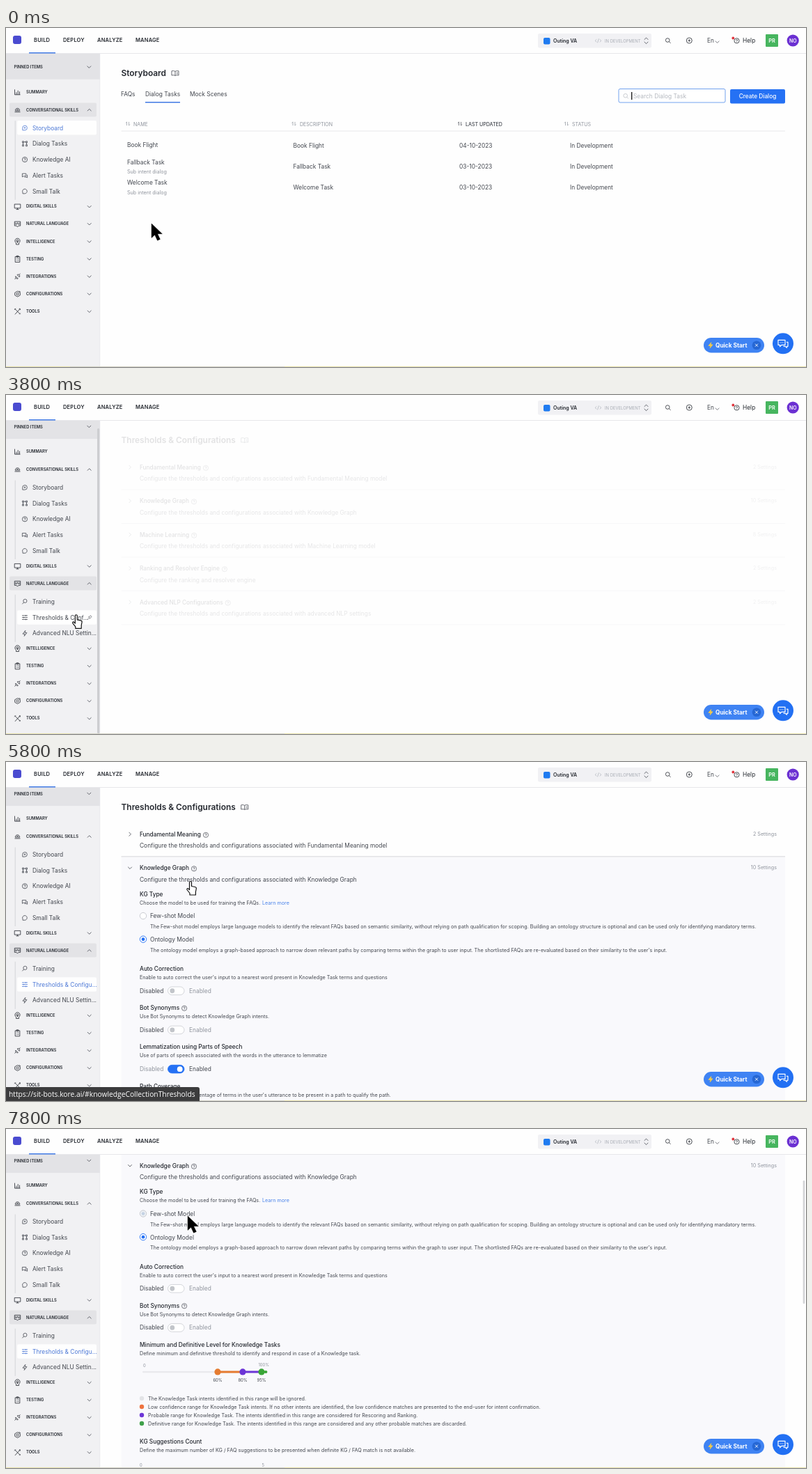
These frames come from a looping animation (1149x487 px, 8 s). An HTML page with a canvas:

```html
<!DOCTYPE html>
<html lang="en">
<head>
<meta charset="utf-8">
<title>Bot builder walkthrough</title>
<style>
html, body { margin: 0; width: 100%; height: 100%; overflow: hidden; background: #fefefe; }
canvas { display: block; width: 1149px; height: 487px; }
</style>
</head>
<body>
<canvas id="stage"></canvas>
<script>
const W = 1149, H = 487, LOOP = 8000, STEP = 200;
const canvas = document.getElementById('stage');
const dpr = window.devicePixelRatio || 1;
canvas.width = W * dpr;
canvas.height = H * dpr;
const c = canvas.getContext('2d');

const INK = '#24282f', BODY = '#42464e', GREY = '#8f949d', PALE = '#b4b8bf';
const BLUE = '#2571f4', LINK = '#4a83ea', ACTIVE = '#4c78d6', LINE = '#c9cacf';
const HOVER = '#f9f9fc', BAND = '#e3e3e6';
// Font sizes: body, small and medium-weight headings.
const M = 8.39, S = 7.2, HEAD = 8.3;

// Icons drawn around their centre.
const ICON = {
  chart: 'M-4-4V3.5H4M-1.7 3.5V0M.7 3.5V-2.5M3 3.5V-1',
  bell: 'M-3.2 1C-3.2-3.6 3.2-3.6 3.2 1ZM-4 2.8H4M-1.5-.6h3',
  story: 'M-3.2 3.3H0A3.3 3.3 0 1 0-3.2.4ZM0-1.4V1M-1.2 0h2.4',
  tasks: 'M-3.5-3.5h2v2h-2zM1.5-3.5h2v2h-2zM-3.5 1.5h2v2h-2zM1.5 1.5h2v2h-2zM-1.5-2.5h3M-2.5-1.5v3M2.5-1.5v3',
  help: 'M3.6 0A3.6 3.6 0 1 1-3.6 0A3.6 3.6 0 1 1 3.6 0M-1.1-.8A1.1 1.1 0 1 1 0 .4V.9M0 1.7v.5',
  alert: 'M-3.6-2.6H1.8V1H-1.5L-3.6 2.2ZM3.6-1V3.2L1.8 2.4H-.6',
  talk: 'M-3 3.4H0A3.3 3.3 0 1 0-3 1.6Z',
  screen: 'M-4.3-3.5H4.3V2.2H-4.3ZM-2 4H2M0 2.2V4',
  speech: 'M-4.2-3.5H4.2V2.5H1.5L0 4.2L-1.5 2.5H-4.2ZM-1.6 1L0-2L1.6 1M2.6-2V1M-2.6-2V1',
  mind: 'M-2 4.2V2A3.6 3.6 0 1 1 2 2V4.2ZM-1.6-1A1.6 1.6 0 1 0 1.6-1A1.6 1.6 0 1 0-1.6-1M0-1V2',
  clip: 'M-3.3-3.5H3.3V4.5H-3.3ZM-1.3-4.6H1.3V-2.6H-1.3ZM-1.6-.4h.8M.2-.4h1.6M-1.6 2h.8M.2 2h1.6',
  plug: 'M-4 4L-2 2M-2.6-.4L.8 3C-.6 4.2-3.8 1.6-2.6-.4ZM-.4-2.4L2.6.8C4.4-1.4 1.6-4.2-.4-2.4M2.4-2.6L4-4',
  gear: 'M-3.8-1.8L0-4L3.8-1.8V1.8L0 4L-3.8 1.8ZM-1.6 0A1.6 1.6 0 1 0 1.6 0A1.6 1.6 0 1 0-1.6 0M2-4.2L4.4-2.8',
  tools: 'M-4-4L4 4M-2.4-4.4L-4.4-2.4M4-4.2L-3.6 4.2M2.2-3.4C3-5 5-2.6 3.4-2M2.6 4L4.2 2.4',
  train: 'M3-1A2.6 2.6 0 1 1-2.2-1A2.6 2.6 0 1 1 3-1M-1.4 1L-3.6 3.4',
  tune: 'M-4-2.8H4M-4 0H4M-4 2.8H4M1.5-3.6v1.6M-1.5-.8v1.6M1.5 2v1.6',
  bolt: 'M.8-4L-3 .8H0L-.8 4L3-.8H0Z',
  pin: 'M-3 3L-.8.8M-1.8-1L1 1.8M-1-.6L1.4-2.8L3 -1.2L.6 1.2',
  search: 'M2-.5A2.8 2.8 0 1 1-3.6-.5A2.8 2.8 0 1 1 2-.5M1.3 1.6L3.6 3.8',
  plus: 'M4 0A4 4 0 1 1-4 0A4 4 0 1 1 4 0M-1.8 0H1.8M0-1.8V1.8',
  code: 'M-2.2-2L-4.4 0L-2.2 2M2.2-2L4.4 0L2.2 2M.9-3L-.9 3',
  book: 'M0-2.6V3.4M0-2.6C-1.5-3.6-3.5-3.6-5-3.2V3C-3.5 2.6-1.5 2.6 0 3.4C1.5 2.6 3.5 2.6 5 3V-3.2C3.5-3.6 1.5-3.6 0-2.6M2-1h1.6M2 .8h1.6',
  sort: 'M-1.5 2.6V-2.6L-3-1M1.5-2.6V2.6L3 1',
  down: 'M-2.8-1.4L0 1.4L2.8-1.4',
  up: 'M-2.8 1.4L0-1.4L2.8 1.4',
  right: 'M-1.4-2.8L1.4 0L-1.4 2.8',
  cross: 'M-2-2L2 2M2-2L-2 2',
  chat: 'M-7-5H3V2H-2L-4.5 4.4V2H-7ZM5-2H7V4H5.5V6L3 4H.5M-4.4-1.5h.8M-2.4-1.5h.8M-.4-1.5h.8',
  arrow: 'M0 0V20.5L4.7 16.2L8.5 24.3L12.4 22.5L8.7 14.7H15.4Z',
  hand: 'M-1.5 1.5C-1.5-.5 1.5-.5 1.5 1.5V7L6.5 8C8 8.3 8.5 9 8.3 10.5L7.4 15V19.5H-1V17L-5 12C-5.6 10.4-4 9.6-3 10.7L-1.5 12.2Z',
  beam: 'M-4-11H-1Q0-11 0-10Q0-11 1-11H4M0-10V10M-4 11H-1Q0 11 0 10Q0 11 1 11H4'
};
for (const k in ICON) ICON[k] = new Path2D(ICON[k]);

function text(s, x, y, size, color = BODY, weight = 400, align = 'left', family = 'Inter') {
  c.font = `${weight} ${size}px "${family}", sans-serif`;
  c.fillStyle = color;
  c.textAlign = align;
  c.fillText(s, x, y + size * 0.36);
  return c.measureText(s).width;
}
function box(x, y, w, h, fill, r = 0, stroke) {
  c.beginPath();
  c.roundRect(x, y, w, h, r);
  if (fill) { c.fillStyle = fill; c.fill(); }
  if (stroke) { c.strokeStyle = stroke; c.lineWidth = 0.8; c.stroke(); }
}
function disc(x, y, r, fill, stroke) {
  c.beginPath();
  c.arc(x, y, r, 0, 7);
  if (fill) { c.fillStyle = fill; c.fill(); }
  if (stroke) { c.strokeStyle = stroke; c.lineWidth = 0.9; c.stroke(); }
}
function icon(name, x, y, color = BODY, width = 0.8, fill) {
  c.save();
  c.translate(x, y);
  c.lineJoin = 'round';
  c.lineWidth = width;
  c.strokeStyle = color;
  if (fill) { c.fillStyle = fill; c.fill(ICON[name]); }
  c.stroke(ICON[name]);
  c.restore();
}
function clip(x, y, w, h, draw) {
  c.save();
  c.beginPath();
  c.rect(x, y, w, h);
  c.clip();
  draw();
  c.restore();
}
// Piecewise linear track of [time, ...values].
function track(keys, t) {
  const i = keys.findIndex(k => k[0] > t);
  if (i < 0) return keys[keys.length - 1].slice(1);
  if (i === 0) return keys[0].slice(1);
  const a = keys[i - 1], b = keys[i], p = (t - a[0]) / (b[0] - a[0]);
  return a.slice(1).map((v, j) => v + (b[j + 1] - v) * p);
}

const POINTER = [[0, 209, 281], [800, 88, 277], [1200, 88, 274], [1800, 98, 315], [2200, 100, 315],
  [4200, 101, 316], [5400, 265, 171], [6200, 265, 172], [6600, 265, 172], [7200, 262, 132], [7800, 261, 125]];
const NAV_SCROLL = [[1000, 0], [1400, 10.7]];
const NAV_OPEN = [[800, 0], [1200, 1]];
const FADE = [[3600, 0], [3800, 0.13], [4200, 1]];
const PAGE_SCROLL = [[6000, 0], [6200, 28.3], [6400, 78], [6600, 99.5]];
const STATUS = [[5200, 0], [5400, 0.72], [5600, 1], [6200, 1], [6400, 0]];

function header() {
  box(0, 0, W, 37, '#fefefe');
  box(0, 36, W, 1, '#e7e7ea');
  box(10, 11, 12, 12, '#4a4bd0', 3);
  c.letterSpacing = '0.2px';
  [['BUILD', 40], ['DEPLOY', 82], ['ANALYZE', 131], ['MANAGE', 186]]
    .forEach(([s, x]) => text(s, x, 17.5, 7.5, INK, 600));
  c.letterSpacing = '0px';
  box(33, 35, 38, 1.6, '#3f78e4');
  box(764, 8, 163, 20.5, '#f1f1f4', 2);
  box(772, 14, 9.5, 9.5, '#1f7bf0', 2);
  text('Outing VA', 786, 18, 7, INK, 600);
  icon('code', 850.5, 18.3, PALE);
  text('IN DEVELOPMENT', 860, 18.5, 5.9, '#a9adb5');
  icon('up', 919.5, 15.4);
  icon('down', 919.5, 21.2);
  icon('search', 951, 18, INK);
  icon('plus', 981.3, 18, INK);
  text('En', 1007, 18.3, M, BODY);
  icon('down', 1021.5, 20, BODY, 0.7);
  icon('help', 1049.5, 18.3, INK);
  disc(1044.3, 14.5, 1.9, '#e0343c');
  text('Help', 1058, 18.3, M, INK);
  box(1091, 9, 18, 18, '#47b55f', 1);
  text('PR', 1100, 18.2, 7.4, '#fff', 600, 'center');
  disc(1130.2, 18, 8.6, '#6b30d2');
  text('NO', 1130.2, 18.2, 6.9, '#fff', 600, 'center');
}

const SKILLS = [['Storyboard', 'story'], ['Dialog Tasks', 'tasks'], ['Knowledge AI', 'help'],
  ['Alert Tasks', 'alert'], ['Small Talk', 'talk']];
const LANG = [['Training', 'train'], ['Thresholds & Configu...', 'tune'], ['Advanced NLU Settin...', 'bolt']];
const REST = [['INTELLIGENCE', 'mind'], ['TESTING', 'clip'], ['INTEGRATIONS', 'plug'],
  ['CONFIGURATIONS', 'gear'], ['TOOLS', 'tools']];

function section(label, glyph, y, open, lit) {
  if (lit) box(5, y - 10, 125, 20, BAND, 2);
  icon(glyph, 16.5, y + 0.3, INK);
  text(label, 29, y, 5.8, INK, 600);
  if (open !== undefined) icon(open ? 'up' : 'down', 119.7, y + 0.3);
}
function entries(list, y, active, hover) {
  box(12.7, y - 10, 1, list.length * 22.7, '#d3d4d8');
  list.forEach(([label, glyph], i) => {
    const cy = y + i * 22.75, over = i === hover, on = i === active;
    if (on || over) box(16, cy - 10.3, 114, 20.5, '#fefefe', 2);
    const color = on && !over ? ACTIVE : BODY;
    icon(glyph, 27, cy + 0.2, color);
    text(over ? 'Thresholds & Conf...' : label, 38, cy + 0.2, M, color);
    if (over) icon('pin', 120, cy + 0.2, BODY, 0.7);
  });
}
function sidebar(t, px) {
  const [dy] = track(NAV_SCROLL, t), [open] = track(NAV_OPEN, t);
  const moved = t >= 2800, inside = px < 131;
  clip(0, 37, 135, 449, () => {
    box(0, 37, 135, 449, '#f1f1f3');
    c.translate(0, -dy);
    box(0, 37, 135, 36.7, BAND);
    text('PINNED ITEMS', 11.5, 56.2, 5.8, INK, 600);
    icon('down', 119.3, 56);
    section('SUMMARY', 'chart', 92);
    section('CONVERSATIONAL SKILLS', 'bell', 117.5, true, !moved);
    entries(SKILLS, 143.3, moved ? -1 : 0);
    section('DIGITAL SKILLS', 'screen', 256.3, false);
    section('NATURAL LANGUAGE', 'speech', 281.3, open > 0, moved);
    if (open > 0) clip(0, 292, 135, 75 * open, () =>
      entries(LANG, 307.4, moved ? 1 : -1, t >= 1600 && inside ? 1 : -1));
    REST.forEach(([s, g], i) => section(s, g, 306.5 + 68.2 * open + i * 25.1, false));
  });
  if (open === 1 && inside) box(131, 48, 3.5, 438, '#cdced1', 1.5);
  box(134.5, 37, 0.7, 449, '#e6e6e9');
}

function title(s) {
  const w = text(s, 165.5, 64.3, 11.9, INK, 600);
  icon('book', 165.5 + w + 13, 65);
}
function storyboard(t) {
  title('Storyboard');
  text('FAQs', 165, 94.5, M);
  text('Dialog Tasks', 200, 94.5, M);
  text('Mock Scenes', 264, 94.5, M);
  box(200, 106, 50, 1.4, '#3f78e4');
  const focus = t < 1000;
  box(880, 87.5, 153, 19.5, '#fff', 2, focus ? '#4f8bea' : '#d9dbe0');
  icon('search', 890.5, 97.7, PALE, 0.7);
  text('Search Dialog Task', 901, 98, M, PALE);
  if (focus && t % 1000 < 600) box(898, 92, 1.4, 11, '#222');
  box(1040, 88, 79, 20.5, BLUE, 2);
  text('Create Dialog', 1079.5, 98.3, HEAD, '#fff', 500, 'center');
  [['NAME', 175, 183], ['DESCRIPTION', 413.5, 422], ['LAST UPDATED', 652, 660], ['STATUS', 805, 813]]
    .forEach(([s, ix, x], i) => {
      icon('sort', ix, 137.5, i === 2 ? BODY : GREY, 0.7);
      text(s, x, 138, 7.05, i === 2 ? BODY : GREY, i === 2 ? 500 : 400);
    });
  box(165.5, 147.5, 953.5, 1, '#e9e9ec');
  ['Book Flight', 'Fallback Task', 'Welcome Task'].forEach((s, i) => {
    const y = 169.2 + i * 29.9;
    text(s, 174, i ? y - 6.6 : 167.5, M);
    if (i) text('Sub intent dialog', 174, y + 7.8, S, GREY);
    text(s, 412.5, y, M);
    text(i ? '03-10-2023' : '04-10-2023', 651, y, M);
    text('In Development', 810, y, M);
  });
}
function loading(t) {
  const a = -2.6 + (t - 2200) / 200 * 1.9;
  c.beginPath();
  c.arc(615.5, 286, 6, a, a + 2.5);
  c.strokeStyle = '#5f8fe8';
  c.lineWidth = 1;
  c.stroke();
  text('Loading...', 630, 286, M);
}

const ROWS = [
  ['Fundamental Meaning', 'Configure the thresholds and configurations associated with Fundamental Meaning model', 2],
  ['Knowledge Graph', 'Configure the thresholds and configurations associated with Knowledge Graph', 10],
  ['Machine Learning', 'Configure the thresholds and configurations associated with Machine Learning model', 8],
  ['Ranking and Resolver Engine', 'Configure the ranking and resolver engine', 2],
  ['Advanced NLP Configurations', 'Configure the thresholds and configurations associated with advanced NLP settings', 2]
];
function heading(s, note, y, help) {
  const w = text(s, 192, y, HEAD, INK, 500);
  if (help) icon('help', 192 + w + 7, y + 0.5, BODY, 0.7);
  text(note, 192, y + 12.4, S);
}
function radio(label, note, y, on, fresh) {
  disc(197, y, 4.7, fresh ? '#eef1f5' : '#fff', on ? BLUE : '#c3c6cc');
  if (on || fresh) disc(197, y, 2.4, on ? BLUE : '#c4d2e4');
  text(label, 207, y + 0.4, M);
  text(note, 207, y + 15.7, S);
}
function toggle(y, on) {
  text('Disabled', 192, y, M, on ? GREY : BODY);
  box(232.5, y - 5.8, 23.5, 11.6, on ? BLUE : '#fff', 5.8, on ? BLUE : '#c9ccd1');
  disc(on ? 249.7 : 238.8, y, on ? 3.9 : 3.4, on ? '#fff' : '#c2c5ca');
  text('Enabled', 263, y, M, on ? BODY : GREY);
}
function levels(y) {
  heading('Minimum and Definitive Level for Knowledge Tasks',
    'Define minimum and definitive threshold to identify and respond in case of a Knowledge task.', y);
  const k = y + 39, stops = [['#e57b30', 304, '60%'], ['#6c35d6', 340, '80%'], ['#3aa637', 367, '95%']];
  text('0', 197, y + 30.2, 5.8, GREY);
  text('100%', 362.5, y + 29, 5.8, GREY);
  box(196, k - 1.3, 180, 2.6, '#e9e9ed', 1.3);
  stops.forEach(([color, x], i) => box(x, k - 1.5, (i < 2 ? stops[i + 1][1] : 373) - x, 3, color));
  disc(373.3, k, 2, stops[2][0]);
  stops.forEach(([color, x, s]) => {
    disc(x, k, 4.6, color);
    text(s, x, y + 50.7, 5.9, BODY, 400, 'center');
  });
  [['#e3e4e7', 'The Knowledge Task intents identified in this range will be ignored.'],
    ['#ee7340', 'Low confidence range for Knowledge Task intents. If no other intents are identified, the low confidence matches are presented to the end-user for intent confirmation.'],
    ['#6c35d6', 'Probable range for Knowledge Task. The intents identified in this range are considered for Rescoring and Ranking.'],
    ['#3fa04a', 'Definitive range for Knowledge Task. The intents identified in this range are considered and any other probable matches are discarded.']
  ].forEach(([color, s], i) => {
    disc(195, y + 77 + i * 12, 3.2, color);
    text(s, 204, y + 77.5 + i * 12, S);
  });
  heading('KG Suggestions Count',
    'Define the maximum number of KG / FAQ suggestions to be presented when definite KG / FAQ match is not available.', y + 139.5);
  text('0', 192, y + 172.5, 5.8, GREY);
  text('5', 367.5, y + 172.5, 5.8, GREY);
}
function graphPanel(y, picked) {
  heading('KG Type', 'Choose the model to be used for training the FAQs. ', y + 37.3);
  text('Learn more', 368, y + 49.7, S, LINK);
  radio('Few-shot Model', 'The Few-shot model employs large language models to identify the relevant FAQs based on semantic similarity, without relying on path qualification for scoping. Building an ontology structure is optional and can be used only for identifying mandatory terms.', y + 68.6, false, picked);
  radio('Ontology Model', 'The ontology model employs a graph-based approach to narrow down relevant paths by comparing terms within the graph to user input. The shortlisted FAQs are re-evaluated based on their similarity to the user\'s input.', y + 102.2, true);
  heading('Auto Correction',
    'Enable to auto correct the user\'s input to a nearest word present in Knowledge Task terms and questions', y + 144.6);
  toggle(y + 176.3, false);
  heading('Bot Synonyms', 'Use Bot Synonyms to detect Knowledge Graph intents.', y + 200.8, true);
  toggle(y + 232.5, false);
  if (picked) return levels(y + 257);
  heading('Lemmatization using Parts of Speech',
    'Use of parts of speech associated with the words in the utterance to lemmatize', y + 257);
  toggle(y + 288.7, true);
  heading('Path Coverage',
    'Define the minimum percentage of terms in the user\'s utterance to be present in a path to qualify the path.', y + 313.3);
  text('0', 192, y + 346.4, 5.8, GREY);
  text('100%', 357, y + 346.4, 5.8, GREY);
  box(192, y + 354, 180, 2.6, '#e9e9ed', 1.3);
  box(192, y + 353.8, 88, 3, BLUE, 1.5);
  disc(280.5, y + 355.3, 4, BLUE);
  text('50%', 282, y + 369.4, 7, BODY, 400, 'center');
  levels(y + 388.5);
}
function thresholds(t, px, py) {
  const [s] = track(PAGE_SCROLL, t), open = t >= 5800;
  c.globalAlpha = track(FADE, t)[0];
  c.save();
  c.translate(0, -s);
  title('Thresholds & Configurations');
  const over = px > 165 ? Math.floor((py + s - 87.5) / 48.5) : -1;
  (open ? ROWS.slice(0, 2) : ROWS).forEach(([name, note, n], i) => {
    const y = 104 + i * 48.45, wide = open && i === 1;
    if (wide || i === over) box(165.5, y - 16, 953.5, wide ? 900 : 48, HOVER);
    icon(wide ? 'down' : 'right', 178, y - 0.3);
    const w = text(name, 192, y, HEAD, INK, 500);
    icon('help', 192 + w + 7, y + 0.8, BODY, 0.7);
    text(note, 192, y + 16.3, M);
    text(n + ' Settings', 1107, y - 0.6, S, GREY, 400, 'right');
    if (!wide) box(165.5, y + 31.5, 953.5, 1, LINE);
    else graphPanel(y, t >= 7800);
  });
  c.restore();
  c.globalAlpha = 1;
  if (t >= 6200) box(1144.7, 29.5 + 0.4475 * s, 2.6, 177, '#d3d4d7', 1.3);
}

function tooltip() {
  c.save();
  c.shadowColor = 'rgba(40,45,60,.2)';
  c.shadowBlur = 5;
  c.shadowOffsetY = 1;
  box(120, 199, 165, 131.5, '#fefefe', 2);
  c.restore();
  text('Thresholds & Configurations', 132, 217, 7.1, BODY, 600);
  ['Fine-tune intent and entity detection by', 'customizing the Machine Learning,',
    'Fundamental Meaning, and Knowledge', 'Graph models. Machine Learning, and',
    'Knowledge Graph models for each of the', 'enabled languages.']
    .forEach((s, i) => text(s, 132, 234 + i * 11.95, S, GREY));
  text('Know more', 132, 315.2, S, LINK);
}
function floating(quick) {
  if (quick) {
    box(1002, 445, 87, 21.5, '#3f83f3', 10.7);
    icon('bolt', 1012, 455.7, '#f6cb45', 0.8, '#f6cb45');
    text('Quick Start', 1019, 456, HEAD, '#fff', 700);
    disc(1078, 455.7, 6.3, '#2667d4');
    icon('cross', 1078, 455.7, '#fff', 0.9);
  }
  disc(1116, 453.3, 15, '#2270f3');
  icon('chat', 1116, 453.3, '#fff', 1.2);
}
function status(a) {
  if (!a) return;
  c.globalAlpha = a;
  box(0, 467, 278, 20, '#3c3c3d', [0, 3, 0, 0]);
  c.globalAlpha = 1;
  text('https://sit-bots.kore.ai/#knowledgeCollectionThresholds', 4, 477.3, 10.28, '#fff', 400, 'left', 'Open Sans');
}
function pointer(t, x, y) {
  if (t >= 6000 && t < 6600) {
    icon('beam', x, y, '#fff', 3);
    icon('beam', x, y, '#111', 1.7);
  } else if (x < 131 || (t >= 4800 && t < 6000)) {
    icon('hand', x, y, '#111', 1.2, '#fff');
  } else {
    icon('arrow', x, y, '#fff', 2);
    icon('arrow', x, y, '#000', 0.4, '#000');
  }
}

function draw(t) {
  const [px, py] = track(POINTER, t);
  c.setTransform(dpr, 0, 0, dpr, 0, 0);
  box(0, 0, W, H, '#fefefe');
  clip(135, 37, W - 135, 449, () => {
    if (t < 2000) storyboard(t);
    else if (t < 3400) loading(t);
    else thresholds(t, px, py);
  });
  sidebar(t, px);
  header();
  floating(t < 2000 || t >= 3200);
  if (t >= 1800 && t < 3000) tooltip();
  box(0, 486, W, 1, '#e9e2ac');
  box(92, 486, 308, 1, '#d6d5c8');
  status(track(STATUS, t)[0]);
  pointer(t, px, py);
}
function loop() {
  const t = performance.now() % LOOP;
  draw(Math.floor(t / STEP) * STEP);
  requestAnimationFrame(loop);
}
loop();
</script>
</body>
</html>
```
